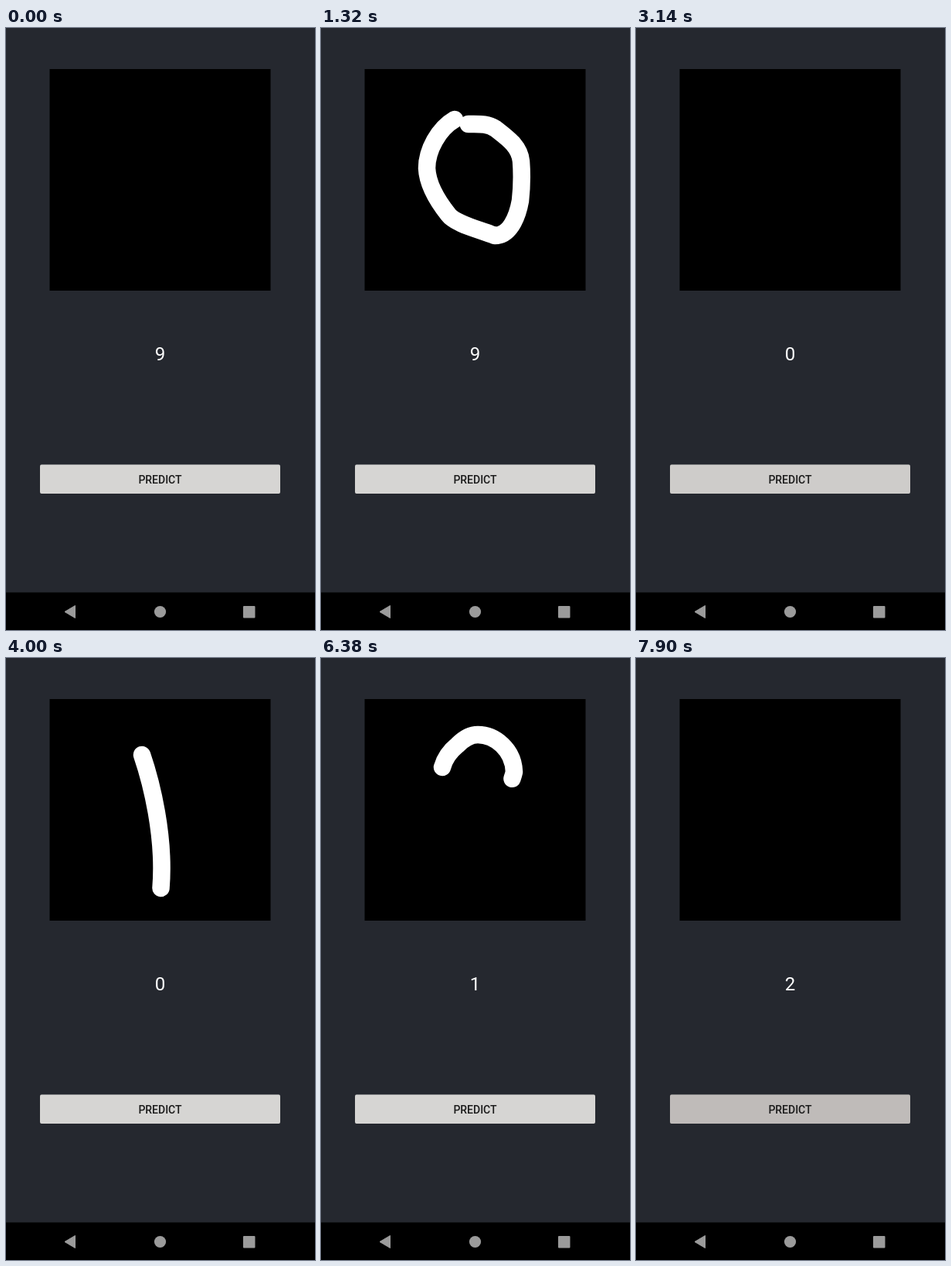
An HTML page for the animation above (8 s loop, 400 by 777 pixels).

```html
<!DOCTYPE html>
<html lang="en">
<head>
<meta charset="utf-8">
<title>Digit prediction</title>
<style>
html, body { margin: 0; height: 100%; overflow: hidden; background: #25282f; }
svg { display: block; width: 100vw; height: 100vh; }
text { font-family: Roboto, sans-serif; text-anchor: middle; }
#pen { fill: none; stroke: #fff; stroke-width: 22.5; stroke-linecap: round; stroke-linejoin: round; }
</style>
</head>
<body>
<svg viewBox="0 0 400 777">
  <clipPath id="key"><rect x="44" y="563.5" width="311" height="37.5" rx="2"/></clipPath>
  <rect width="400" height="777" fill="#25282f"/>
  <rect x="56.5" y="53" width="286" height="286"/>
  <path id="pen"/>
  <text id="digit" x="199.5" y="429" font-size="24" fill="#fff">9</text>
  <g clip-path="url(#key)">
    <rect x="44" y="563" width="311" height="39" fill="#d6d5d3"/>
    <circle id="ripple" cx="227" cy="582" fill="#180000"/>
  </g>
  <text x="199.5" y="588" font-size="14" font-weight="500" fill="#1b1b1b">PREDICT</text>
  <rect y="728.5" width="400" height="49"/>
  <g fill="#9b9b9b">
    <path d="M76 753.5L89.5 745.5V761.5Z" stroke="#9b9b9b" stroke-linejoin="round"/>
    <circle cx="199.5" cy="753.5" r="7.6"/>
    <rect x="307" y="746" width="15.5" height="15.5" rx="1"/>
  </g>
</svg>
<script>
const $ = id => document.getElementById(id);
const pen = $('pen'), digit = $('digit'), ripple = $('ripple');

// moves: [start, end, steps, fraction from, fraction to]
// press: finger down; full: ripple complete; fade: mostly faded; rest: plain button
const rounds = [
  { d: 'M173 118C152 130 137 158 137 181C138 203 153 226 165 241C174 253 205 260 225 268' +
       'C244 268 254 245 258 223C260 205 260 185 259 172C257 152 240 141 226 130' +
       'C215 123 205 124 191 124L173 124',
    moves: [[500, 1200, 13, .03, .72], [1320, 1320, 1, .958, .958], [2740, 2740, 1, 1, 1]],
    press: 2740, clear: 2960, full: 3000, fade: 3140, rest: 3860, answer: 0 },
  { d: 'M176 125C188 160 206 230 200.5 297',
    moves: [[3860, 4000, 3, .25, 1]],
    press: 5100, clear: 5200, full: 5240, fade: 5400, rest: 6220, answer: 1 },
  { d: 'M157 141C160 130 167 120 177 112C187 102 195 99 203 99C225 99 249 118 250 147' +
       'C246 165 230 195 216 210C200 228 172 255 152 261L285 261',
    moves: [[6220, 6520, 6, .12, .69], [6780, 6920, 4, .74, 1]],
    press: 7660, clear: 7820, full: 7900, fade: 8000, rest: 8000, answer: 2 }
];

const clamp = v => Math.max(0, Math.min(1, v));

function drawn(moves, t) {
  const move = moves.filter(m => t >= m[0]).pop();
  if (!move) return 0;
  const [start, end, steps, from, to] = move;
  if (steps === 1) return to;
  const k = clamp(Math.floor((t - start) / (end - start) * (steps - 1) + 1e-6) / (steps - 1));
  return from + (to - from) * k;
}

function render(t) {
  let shown = 0, path = '', answer = 9, radius = 0, shade = 0;
  for (const r of rounds) {
    if (t >= r.moves[0][0] && t < r.clear) {
      path = r.d;
      shown = drawn(r.moves, t);
    }
    if (t >= r.clear) answer = r.answer;
    if (t >= r.press && t < r.rest) {
      const u = clamp((t - r.press) / (r.full - r.press));
      const grow = clamp((u - .44) / .4);
      radius = 99.5 + 100 * grow;
      shade = t >= r.fade ? .045 : .07 + .053 * grow;
    }
  }
  pen.setAttribute('d', path);
  if (path) {
    const length = pen.getTotalLength();
    pen.setAttribute('stroke-dasharray', `${shown * length} ${length * 2}`);
  }
  digit.textContent = answer;
  ripple.setAttribute('r', radius);
  ripple.setAttribute('opacity', shade);
}

function tick() {
  render(Math.floor(performance.now() % 8000 / 20) * 20);
  requestAnimationFrame(tick);
}
tick();
</script>
</body>
</html>
```
